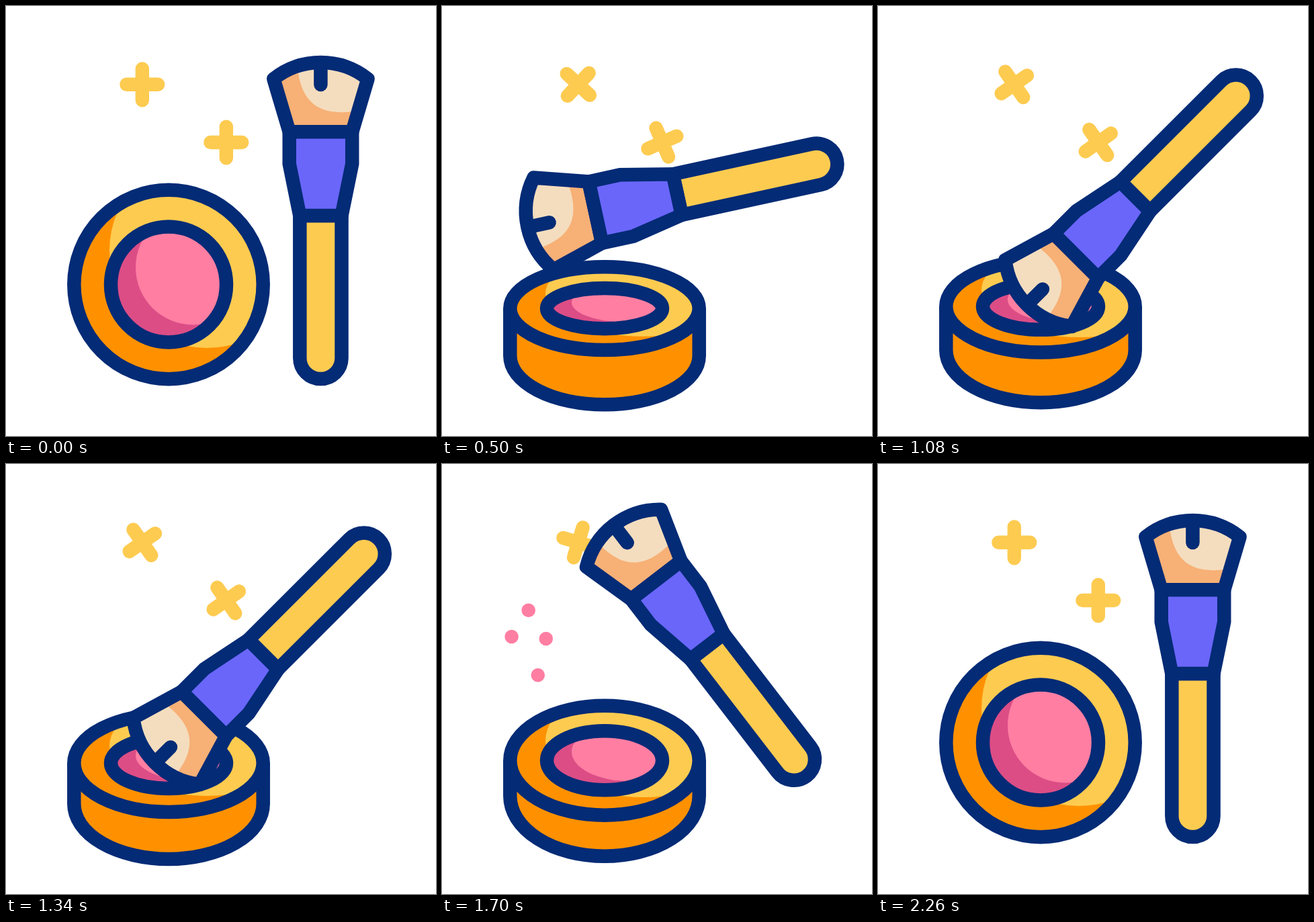
Write an HTML page with a canvas that moves like this. It is 640 by 640 pixels and loops after 2.4 s.

```html
<!DOCTYPE html>
<html lang="en">
<head>
<meta charset="utf-8">
<title>Blush and brush</title>
<style>
  html, body { margin: 0; width: 100%; height: 100%; overflow: hidden; background: #fff; }
  canvas { display: block; width: 640px; height: 640px; }
</style>
</head>
<body>
<canvas id="stage" width="640" height="640"></canvas>
<script>
const ctx = document.getElementById('stage').getContext('2d');
const LOOP = 2400;
const LINE = 20.5;
const C = {
  navy: '#042b76', yellow: '#fdcb50', orange: '#ff9100', pink: '#ff7ea2',
  berry: '#dc4d86', purple: '#6a66fa', cream: '#f4ddbe', tan: '#f7b076'
};

const clamp = x => Math.max(0, Math.min(1, x));

// Cubic Bezier easing with flat ends.
function ease(x, x1 = 0.42, x2 = 0.58) {
  if (x <= 0 || x >= 1) return clamp(x);
  let lo = 0, hi = 1, s = 0.5;
  for (let i = 0; i < 24; i++) {
    s = (lo + hi) / 2;
    const bx = 3 * (1 - s) * (1 - s) * s * x1 + 3 * (1 - s) * s * s * x2 + s * s * s;
    if (bx < x) lo = s; else hi = s;
  }
  return s * s * (3 - 2 * s);
}

// Eased value through [time, value] keys.
function track(keys, t) {
  if (t <= keys[0][0]) return keys[0][1];
  for (let i = 1; i < keys.length; i++) {
    const [t0, a] = keys[i - 1], [t1, b] = keys[i];
    if (t < t1) return a + (b - a) * ease((t - t0) / (t1 - t0));
  }
  return keys[keys.length - 1][1];
}

const TILT = [[0, 0], [550, 1.005], [1525, 0.84], [2265, 0]];
const SPIN = [[0, 0], [640, -52], [900, -35], [1350, -35], [1710, 17], [2000, 0]];

const swing = t => ease(t / 880, 0.434, 0.371);

function brushTurn(t) {
  if (t < 1390) return swing(t);
  if (t < 1640) return 1 - swing(t - 1390);
  return 0.28 * Math.pow(Math.max(0, (2280 - t) / 580), 3.5);
}

function paint(path, fill) {
  ctx.fillStyle = fill;
  ctx.fill(path);
}

function outline(path, join = 'miter') {
  ctx.strokeStyle = C.navy;
  ctx.lineWidth = LINE;
  ctx.lineJoin = join;
  ctx.stroke(path);
}

function clipped(path, draw) {
  ctx.save();
  ctx.clip(path);
  draw();
  ctx.restore();
}

function oval(x, y, rx, ry) {
  const p = new Path2D();
  p.ellipse(x, y, rx, ry, 0, 0, 2 * Math.PI);
  return p;
}

function star(x, y, degrees) {
  const arm = 23.4;
  ctx.save();
  ctx.translate(x, y);
  ctx.rotate(degrees * Math.PI / 180);
  ctx.strokeStyle = C.yellow;
  ctx.lineWidth = 20.4;
  ctx.lineCap = 'round';
  ctx.beginPath();
  ctx.moveTo(-arm, 0);
  ctx.lineTo(arm, 0);
  ctx.moveTo(0, -arm);
  ctx.lineTo(0, arm);
  ctx.stroke();
  ctx.restore();
}

// A shaded ring: dark base, offset light circle, outline.
function lid(y, r, ry, dark, light, dx, dy, lightR) {
  const k = ry / r, x = 242;
  const shape = oval(x, y, r, ry);
  paint(shape, dark);
  clipped(shape, () => paint(oval(x + dx, y + dy * k, lightR, lightR * k), light));
  outline(shape);
}

function compact(p) {
  const x = 242, r = 140.7;
  const top = 414.5 + 36 * p;
  if (p > 0.001) {
    const base = 414.5 + 107.5 * p;
    const wall = new Path2D();
    wall.moveTo(x + r, top);
    wall.lineTo(x + r, base);
    wall.ellipse(x, base, r, r - 69 * p, 0, 0, Math.PI);
    wall.lineTo(x - r, top);
    paint(wall, C.orange);
    outline(wall);
  }
  lid(top, r, r - 79.7 * p, C.orange, C.yellow, 57, -50.5, 145);
  lid(top, 86, 86 - 56.5 * p, C.berry, C.pink, 36.5, -25.5, 85.5);
}

const handle = new Path2D('M437.3 312V524A31.1 31.1 0 0 0 499.5 524V312Z');
const ferrule = new Path2D('M421.7 187.3H515.2V235L499.5 312H437.3L421.7 235Z');
const head = new Path2D('M398.3 108.5A112.6 112.6 0 0 1 538.5 108.5L515.2 187.3H421.7Z');
const gloss = new Path2D('M434 94C440 140 462 165 520 156.5L560 100L468 60Z');
const notch = new Path2D('M468.4 90V117');

function brush(turn) {
  const px = 468.4, py = 433;
  ctx.save();
  ctx.translate(px, py - 235 * turn);
  ctx.rotate(-135 * turn * Math.PI / 180);
  ctx.translate(-px, -py);
  ctx.lineCap = 'round';
  paint(handle, C.yellow);
  outline(handle);
  paint(head, C.tan);
  clipped(head, () => paint(gloss, C.cream));
  outline(notch);
  outline(head, 'round');
  paint(ferrule, C.purple);
  outline(ferrule);
  ctx.restore();
}

const POWDER = [[-71, -44], [-96, -5], [-45, -2], [-57, 52]];

function powder(t) {
  const k = (t - 1620) / 340;
  if (t < 1640 || k >= 1) return;
  const spread = 1.8 * (1 - Math.pow(1 - k, 3));
  const r = 10.3 * Math.min(1, 4 * (1 - k));
  for (const [dx, dy] of POWDER) {
    paint(oval(200 + dx * spread, 262 + dy * spread, r, r), C.pink);
  }
}

function draw(t) {
  ctx.fillStyle = '#fff';
  ctx.fillRect(0, 0, 640, 640);
  star(202.8, 116.8, track(SPIN, t));
  star(327.8, 203, track(SPIN, t - 200));
  compact(track(TILT, t));
  powder(t);
  brush(brushTurn(t));
}

function tick() {
  draw(performance.now() % LOOP);
  requestAnimationFrame(tick);
}
tick();
</script>
</body>
</html>
```
